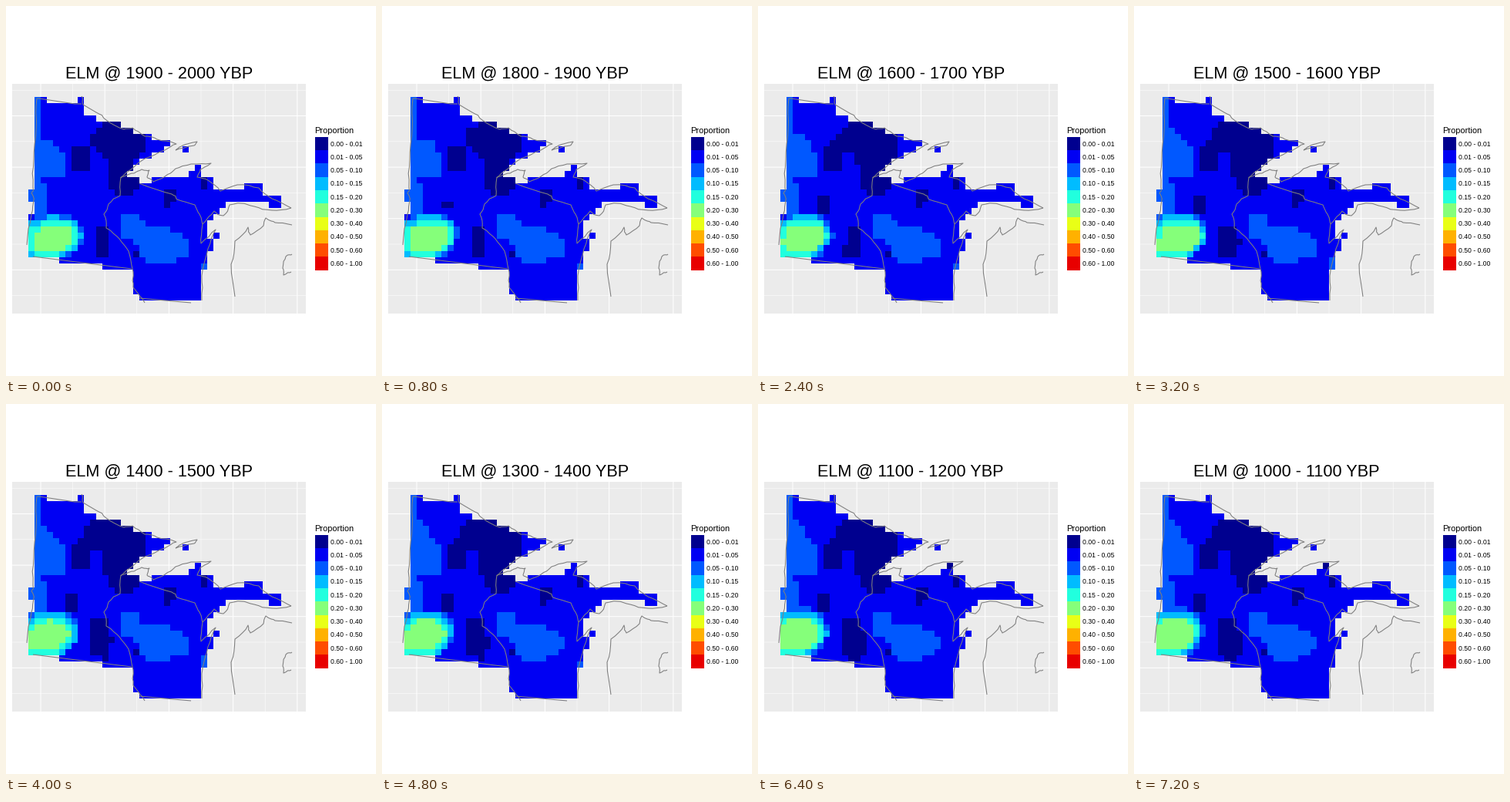
Write a matplotlib script that moves like this. It is 480 px wide and 480 px high and loops after 8 s.

```python
import random
import numpy as np
import matplotlib.pyplot as plt
from matplotlib.animation import FuncAnimation
from matplotlib.patches import Rectangle
from matplotlib.path import Path

SIZE, DPI = 480, 100
CELL, LEFT, TOP = 8, 29, 118
COLS, ROWS = 42, 33
STEPS, STEP_MS = 10, 800
PT = 72 / DPI  # points per pixel
random.seed(4)

X, Y = np.meshgrid(np.arange(COLS) + .5, np.arange(ROWS) + .5)
CENTRES = np.column_stack([X.ravel(), Y.ravel()])


def jet(k):
    """Blue-to-red ramp in even steps of 100."""
    v = 143 + 100 * k
    rgb = (min(v - 510, 1275 - v), min(v - 255, 1020 - v), min(v, 765 - v))
    return tuple(min(max(c, 0), 255) / 255 for c in rgb)


COLORS = [jet(k) for k in range(10)]
BREAKS = [0, .01, .05, .1, .15, .2, .3, .4, .5, .6, 1]


def inside(points):
    """Cells whose centre lies within the outline."""
    return Path(points).contains_points(CENTRES).reshape(ROWS, COLS)


def rect(x, y, w=1, h=1):
    return [(x, y), (x + w, y), (x + w, y + h), (x, y + h)]


class Zone:
    """Outline that drifts from start to end, one level throughout."""

    def __init__(self, level, start, end=None, steps=9, since=0, until=STEPS):
        self.level, self.steps = level, steps
        self.start = np.array(start, float)
        self.end = self.start if end is None else np.array(end, float)
        self.since, self.until = since, until

    def paint(self, grid, n):
        if self.since <= n < self.until:
            k = min(1, n / self.steps)
            grid[inside(self.start + (self.end - self.start) * k)] = self.level


def paint_peak(grid, n):
    """Nested contours, steep to the east, flat to the west."""
    k = n / (STEPS - 1)
    cx, cy, height = 4.3 - 1.2 * k, 23 - .3 * k, 2.2 + .25 * k
    dy = Y - cy
    u = (X - cx + .5 * np.maximum(dy, 0)) / 3.2
    reach = np.abs(u) ** 1.6
    reach = np.where(u < 0, np.minimum(reach, 1.02), reach)
    d = np.hypot(reach, dy / height)
    for level, limit in ((2, 1.8), (3, 1.6), (4, 1.3), (5, 1)):
        grid[d < limit] = level


LAND = inside([
    (1, 0), (3, 0), (3, 1), (8, 1), (8, 0), (9, 0), (9, 3), (14.3, 4.3),
    (22.9, 7.6), (21.9, 8.5), (18, 10.5), (16, 12.5), (18, 13), (18, 14),
    (22, 13), (26, 13), (27, 11), (28, 11), (28, 13), (30, 13), (30, 15),
    (35, 15), (35, 14), (38, 14), (38, 16), (41, 16), (41, 18), (39, 18),
    (39, 17), (33, 17), (29, 20), (29, 28), (28, 28), (28, 33), (17.6, 33),
    (17, 28), (15.5, 28), (0, 25.8), (0, 19), (1, 19), (1, 17), (0, 17),
    (0, 15), (1, 15)])
for x, y in ((25, 8), (30, 22), (29, 23), (29, 24)):
    LAND[y, x] = True

ZONES = [
    # western margin
    Zone(2, [(0, 0), (2, 0), (2, 7), (4, 7), (6, 9.6), (6, 12), (5, 13),
             (2, 13), (2, 14), (3, 14), (3, 18), (2, 19), (0, 19)],
         [(0, 0), (2, 0), (2, 4), (4, 6), (6, 9), (6, 12), (5, 13),
          (2, 13), (2, 14), (3, 14), (3, 18), (2, 19), (0, 19)], steps=6),
    # south-east patch
    Zone(2, [(16, 19), (18, 19), (19, 21), (23, 21.4), (26, 23), (26, 25.7),
             (22, 27), (19, 27), (17, 23.5), (15, 23), (15, 20)],
         [(16, 19), (18, 19), (18, 20.8), (22, 21), (26, 23), (26, 25),
          (22, 27), (19, 27), (17.5, 23.5), (15, 22.8), (15, 20)]),
    # northern low, two lobes
    Zone(0, [(13, 4), (15, 4), (19, 6.3), (19, 9), (17, 10.6), (16.3, 12.8),
             (18, 13), (18, 15), (16.8, 16), (14.8, 16), (13, 14.5),
             (13.5, 11), (12, 9), (10, 7), (10, 6)],
         [(11, 4), (15, 4), (19, 6.3), (19, 9), (18, 10.5), (16.5, 12.8),
          (18, 13), (18, 15), (16.8, 16), (14, 16), (13, 14.5),
          (12.3, 12), (12, 9), (9, 9), (9, 6)], steps=4),
    Zone(0, [(8, 8), (10, 8), (10, 9), (10, 10), (10, 12), (8, 12),
             (7, 11), (7, 9)],
         [(9, 7), (11, 7), (11, 9), (10, 9), (10, 12), (8, 12),
          (7, 11), (7, 8)], steps=4),
    # southern low
    Zone(0, [(11, 21), (13, 21), (13, 23), (13, 26), (11, 26)],
         [(10, 20), (13, 20), (14, 24), (13, 27), (9.5, 26)], steps=8),
    # small spots
    Zone(0, rect(6, 17, 2, 1), rect(6, 16, 2, 3), steps=5, since=1),
    Zone(0, rect(17, 25)),
    Zone(0, rect(22, 15, 2, 2)),
    Zone(0, rect(22, 17)),
    Zone(0, rect(28, 13, 1, 2)),
    Zone(0, rect(27, 11), since=7),
    Zone(2, rect(28, 27), until=7),
    Zone(2, rect(28, 26), since=4, until=6),
]


def raster(n):
    grid = np.ones((ROWS, COLS), int)
    paint_peak(grid, n)
    for zone in ZONES:
        zone.paint(grid, n)
    return np.dstack([np.array(COLORS)[grid], LAND.astype(float)])


def rough(points, amount, passes=2):
    """Split each stretch at a slightly shifted midpoint."""
    for _ in range(passes):
        line = [points[0]]
        for (x0, y0), (x1, y1) in zip(points, points[1:]):
            line.append(((x0 + x1) / 2 + random.uniform(-amount, amount),
                         (y0 + y1) / 2 + random.uniform(-amount, amount)))
            line.append((x1, y1))
        points, amount = line, amount / 2
    return points


STRAIGHT = [
    [(98, 127), (89, 127), (43, 120), (40, 120)],
    [(35, 325), (163, 341)],
    [(173, 379), (240, 385)],
]
COASTS = [
    # west river
    [(40, 120), (39, 160), (36, 200), (35, 235), (33, 243), (36, 252),
     (33, 270), (27, 310)],
    # north shore
    [(98, 117), (100, 128), (117, 138), (130, 148), (153, 160), (164, 158),
     (180, 169), (196, 173), (221, 179), (206, 187), (180, 198), (149, 223)],
    # island
    [(220, 187), (229, 181), (248, 176), (244, 181), (220, 187)],
    # east river
    [(149, 222), (148, 246), (133, 257), (127, 270), (130, 288), (147, 302),
     (159, 318), (165, 345), (165, 365), (180, 385)],
    # south shore
    [(149, 222), (166, 217), (176, 212), (186, 213), (183, 222), (191, 228),
     (205, 222), (220, 211), (240, 205), (266, 204), (252, 212), (248, 222),
     (262, 226), (278, 240), (300, 232), (328, 236), (345, 250), (370, 262)],
    # inland border
    [(173, 230), (215, 244), (222, 251), (245, 258), (251, 270), (255, 283)],
    # west side of the lake
    [(254, 382), (254, 350), (262, 315), (272, 290), (253, 308), (255, 283),
     (270, 266), (282, 272), (290, 258), (305, 256), (322, 260), (345, 265),
     (370, 262)],
    # east side of the lake
    [(371, 284), (349, 281), (337, 275), (334, 285), (317, 297), (314, 287),
     (297, 305), (292, 335), (297, 377)],
    [(371, 322), (363, 325), (359, 340), (360, 349), (370, 345)],
]
BORDERS = STRAIGHT + [rough(line, 1.5) for line in COASTS]

plt.rcParams["font.family"] = "Liberation Sans"
fig = plt.figure(figsize=(SIZE / DPI, SIZE / DPI), dpi=DPI, facecolor="white")
ax = fig.add_axes([0, 0, 1, 1])
ax.axis("off")


def box(x, y, w, h, color):
    ax.add_patch(Rectangle((x, y), w, h, fc=color, lw=0, zorder=0))


def stroke(xs, ys, color, width, z):
    ax.plot(xs, ys, color=color, lw=width * PT, zorder=z, snap=False,
            solid_capstyle="butt")


def label(x, y, text, px, ha="left"):
    return ax.text(x, y, text, fontsize=px * PT, ha=ha, va="baseline",
                   color="black")


# Panel and grid
box(8, 101, 381, 298, "#EBEBEB")
for shift, width in ((0, 1.07), (.5, .53)):
    for i in range(-1, 5):
        x, y = 45 + 83.2 * (i + shift), 142.5 + 66.6 * (i + shift)
        if 8 < x < 389:
            stroke([x, x], [101, 399], "white", width, 1)
        if 101 < y < 399:
            stroke([8, 389], [y, y], "white", width, 1)

tiles = ax.imshow(raster(0), aspect="auto", interpolation="nearest", zorder=2,
                  extent=(LEFT, LEFT + COLS * CELL, TOP + ROWS * CELL, TOP))
for line in BORDERS:
    stroke(*zip(*line), "#7F7F7F", 1.07, 3)

# Legend
label(400.5, 165, "Proportion", 11)
KEY = 17.28
for k, color in enumerate(COLORS):
    y = 169.9 + KEY * k
    box(401, y, KEY, KEY, color)
    label(420.6, y + KEY / 2 + 3,
          f"{BREAKS[k]:.2f} - {BREAKS[k + 1]:.2f}", 8.7)

title = label(198.2, 94, "", 21.7, "center")
ax.set_xlim(0, SIZE)
ax.set_ylim(SIZE, 0)


def update(n):
    year = 1900 - 100 * n
    title.set_text(f"ELM @ {year} - {year + 100} YBP")
    tiles.set_data(raster(n))
    return tiles, title


anim = FuncAnimation(fig, update, frames=STEPS, interval=STEP_MS, repeat=True,
                     repeat_delay=0)
plt.show()
```
